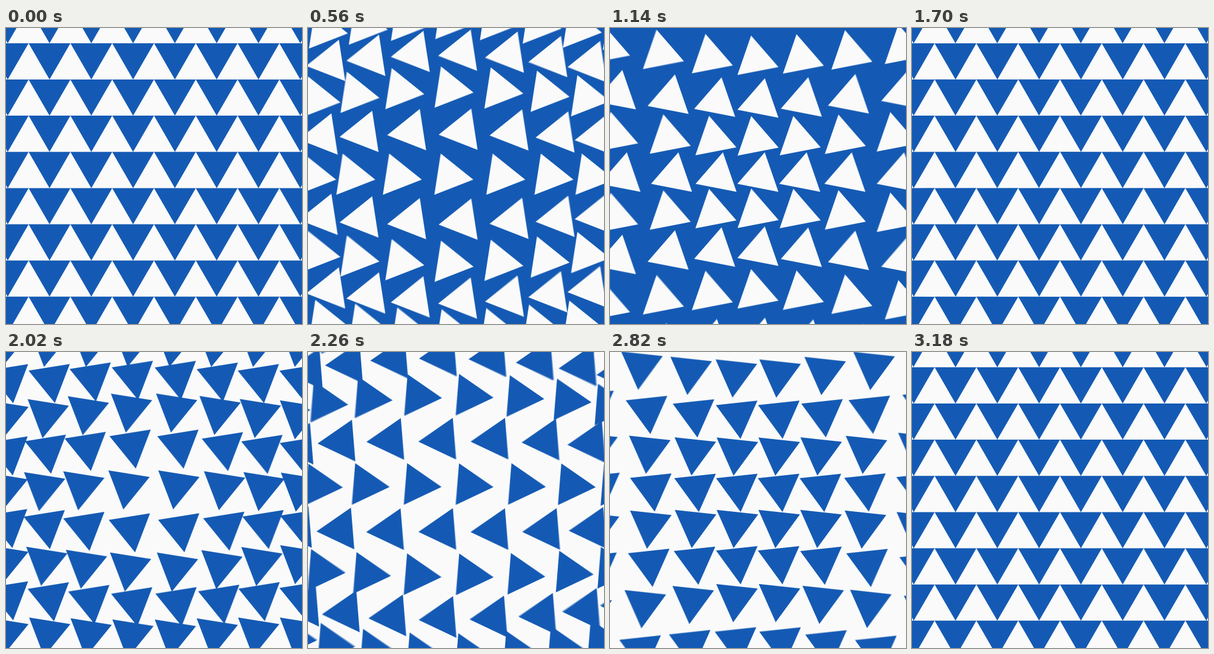
Animation of 500 by 500 pixels, one loop 3200 ms. Source, as an HTML page with a canvas:

```html
<!DOCTYPE html>
<html lang="en">
<head>
<meta charset="utf-8">
<title>Triangle waves</title>
<style>
  html, body { margin: 0; width: 100%; height: 100%; overflow: hidden; background: #fafafa; }
  canvas { display: block; width: 500px; height: 500px; }
</style>
</head>
<body>
<canvas id="stage" width="500" height="500"></canvas>
<script>
const stage = document.getElementById('stage').getContext('2d');
const layer = document.createElement('canvas');
layer.width = layer.height = 500;
const ctx = layer.getContext('2d');

const BLUE = '#145ab4';
const WHITE = '#fafafa';
const LOOP = 3200;
const HALF = LOOP / 2;
const SIDE = 70.6;
const ROW = SIDE * Math.sqrt(3) / 2;
const RADIUS = SIDE / Math.sqrt(3);
const CORNER = 250 * Math.SQRT2;
const SWELL = 0.25;
const SAMPLES = 4;
const SHUTTER = 12;

function ease(p, power) {
  return p < 0.5
    ? 0.5 * Math.pow(2 * p, power)
    : 1 - 0.5 * Math.pow(2 - 2 * p, power);
}

// Swelling that travels outwards and reaches the corners a third of a phase late.
function swell(p, r) {
  const x = (p - r / CORNER / 3) * 1.5;
  return x > 0 && x < 1 ? 1 + SWELL * Math.sin(Math.PI * x) ** 2 : 1;
}

function addTriangle(x, y, angle) {
  for (let i = 0; i < 3; i++) {
    const a = angle + i * Math.PI * 2 / 3;
    const px = x + RADIUS * Math.cos(a);
    const py = y + RADIUS * Math.sin(a);
    if (i) ctx.lineTo(px, py);
    else ctx.moveTo(px, py);
  }
  ctx.closePath();
}

function drawScene(time) {
  const t = time % LOOP;
  const down = t >= HALF;
  const p = (t % HALF) / HALF;
  const turn = ease(p, 3) * Math.PI * 2 / 3;
  const slide = ease(p, 4) * SIDE;
  const point = down ? 1 : -1;

  ctx.fillStyle = down ? WHITE : BLUE;
  ctx.fillRect(0, 0, 500, 500);
  ctx.fillStyle = down ? BLUE : WHITE;
  ctx.beginPath();
  for (let row = -6; row <= 6; row++) {
    const dir = row % 2 ? 1 : -1;
    const y = row * ROW - (down ? RADIUS / 2 : 0);
    const angle = point * Math.PI / 2 + (down ? -dir : dir) * turn;
    for (let col = -7; col <= 7; col++) {
      const x = (col + (down ? 0.5 : 0)) * SIDE + dir * slide;
      const k = swell(p, Math.hypot(x, y));
      addTriangle(250 + x * k, 250 + y * k, angle);
    }
  }
  ctx.fill();
}

// Averages a few finished pictures for a short motion blur.
function render(time) {
  for (let i = 0; i < SAMPLES; i++) {
    drawScene(time + SHUTTER * (i + 0.5) / SAMPLES);
    stage.globalAlpha = 1 / (i + 1);
    stage.drawImage(layer, 0, 0);
  }
}

let start;
function tick(now) {
  if (start === undefined) start = now;
  render(Math.max(0, now - start));
  requestAnimationFrame(tick);
}
render(0);
requestAnimationFrame(tick);
</script>
</body>
</html>
```
